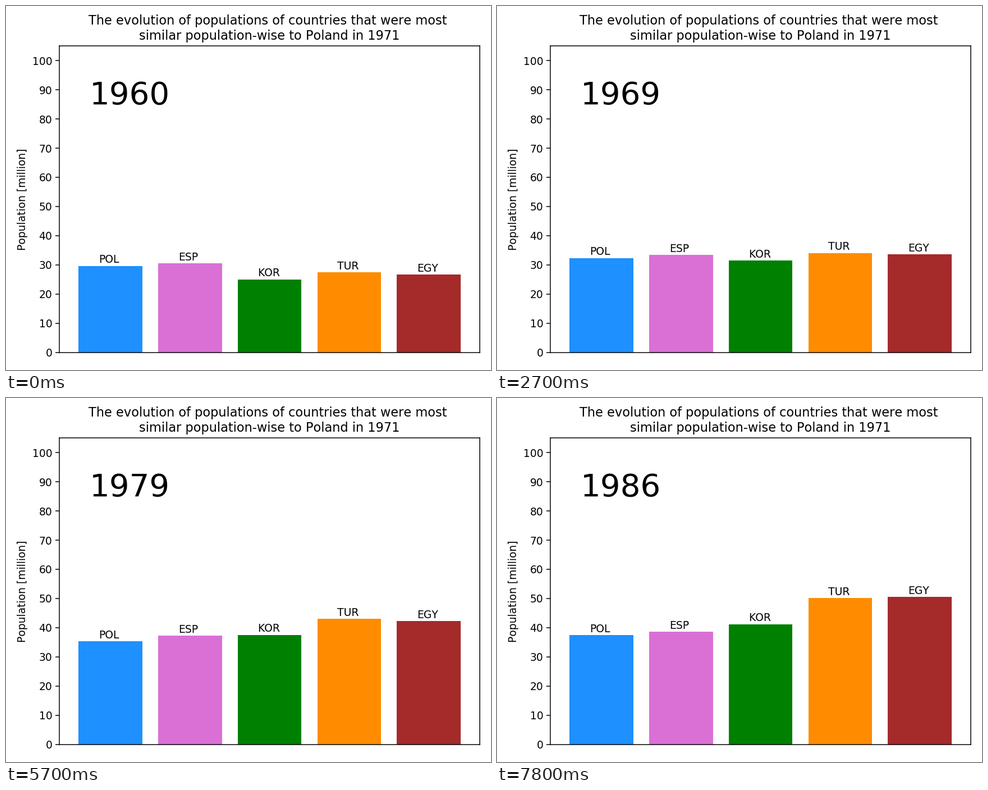
A matplotlib script that plays this animation: 864x648 px, repeating every 8 s.

```python
import matplotlib.pyplot as plt
import numpy as np
from matplotlib.animation import FuncAnimation

WIDTH, HEIGHT, DPI = 864, 648, 135
STEP_MS, LOOP_MS, YEAR_MS = 100, 8000, 300
FIRST_YEAR, LAST_YEAR = 1960, 1986

# Each population curve is a smooth polynomial through a few key years.
KEY_YEARS = np.array([1960, 1966, 1972, 1979, 1986])
COUNTRIES = {
    "POL": ("dodgerblue", [29.64, 31.68, 33.06, 35.25, 37.46]),
    "ESP": ("orchid", [30.46, 32.28, 34.60, 37.19, 38.58]),
    "KOR": ("green", [25.01, 29.44, 33.51, 37.53, 41.21]),
    "TUR": ("darkorange", [27.47, 31.72, 36.59, 42.99, 50.13]),
    "EGY": ("brown", [26.63, 31.23, 36.10, 42.30, 50.57]),
}


def growth_curve(millions):
    return np.poly1d(np.polyfit(KEY_YEARS - FIRST_YEAR, millions, len(KEY_YEARS) - 1))


plt.rcParams["font.family"] = "DejaVu Sans"
plt.rcParams["text.kerning_factor"] = 6
fig = plt.figure(figsize=(WIDTH / DPI, HEIGHT / DPI), dpi=DPI)

left, right, top, bottom = 95.45, 843.9, 71.3, 616.5
ax = fig.add_axes([left / WIDTH, 1 - bottom / HEIGHT,
                   (right - left) / WIDTH, (bottom - top) / HEIGHT])
ax.set_xlim(-0.64, 4.64)
ax.set_ylim(0, 105)
ax.set_xticks([])
ax.set_yticks(range(0, 101, 10))
ax.set_ylabel("Population [million]")
ax.set_title("The evolution of populations of countries that were most \n"
             "similar population-wise to Poland in 1971")

colors = [color for color, _ in COUNTRIES.values()]
curves = [growth_curve(millions) for _, millions in COUNTRIES.values()]
bars = ax.bar(range(len(COUNTRIES)), [0] * len(COUNTRIES), color=colors)
labels = [ax.text(i - 0.15, 0, code) for i, code in enumerate(COUNTRIES)]
year_text = ax.text(-0.265, 85, "", fontsize=30)


def update(frame):
    elapsed = min(frame * STEP_MS // YEAR_MS, LAST_YEAR - FIRST_YEAR)
    for curve, bar, label in zip(curves, bars, labels):
        value = curve(elapsed)
        bar.set_height(value)
        label.set_y(value + 1)
    year_text.set_text(str(FIRST_YEAR + elapsed))
    return [*bars, *labels, year_text]


anim = FuncAnimation(fig, update, frames=LOOP_MS // STEP_MS, interval=STEP_MS,
                     repeat=True, repeat_delay=0, blit=False)
plt.show()
```
